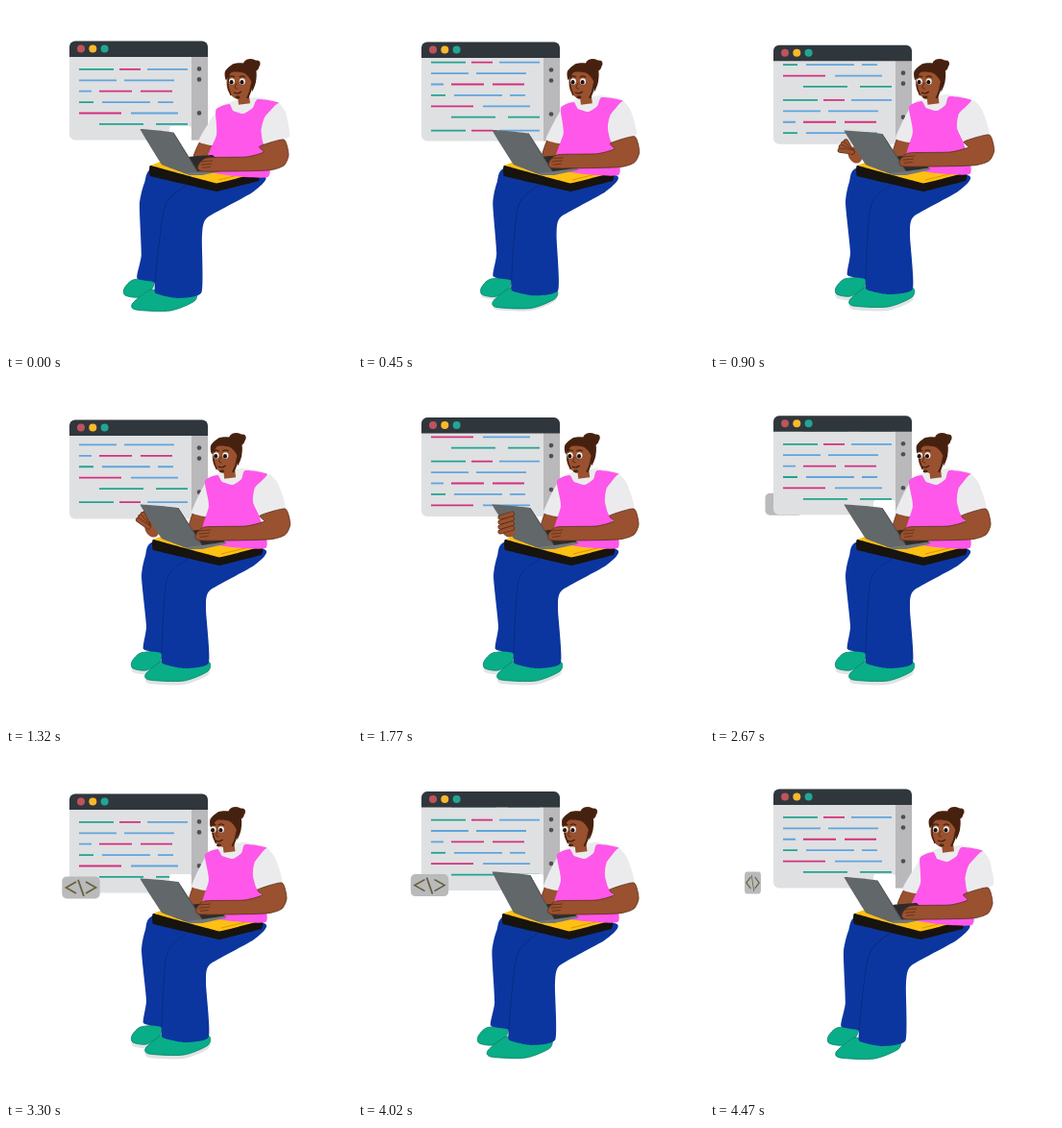
Animation, 360 px wide and 360 px high, one loop 4500 ms. Source, as an HTML page with a canvas:

```html
<!DOCTYPE html>
<html lang="en">
<head>
<meta charset="utf-8">
<title>Coding at a laptop</title>
<style>
html, body { margin: 0; width: 100%; height: 100%; overflow: hidden; background: #fff; }
canvas { display: block; width: 100vw; height: 100vh; }
</style>
</head>
<body>
<canvas id="stage" width="360" height="360"></canvas>
<script>
const ctx = document.getElementById('stage').getContext('2d');
const LOOP = 4500;
const SKIN = '#99512f', SKIN_LINE = '#5a2d18', HAIR = '#47210f';
const PINK = '#fe57ea', TEE = '#ebebed', BLUE = '#0c369f', NAVY = '#092c82', GREEN = '#09ad88';
const TEAL = '#20a491', ROSE = '#d3307f', SKY = '#5fa5dd';

// Timing
const mix = (a, b, k) => a + (b - a) * k;
const part = (t, a, b) => Math.max(0, Math.min(1, (t - a) / (b - a)));
const ramp = (t, a, b) => { const x = part(t, a, b); return x * x * (3 - 2 * x); };
const pulse = (t, a, b) => Math.sin(Math.PI * part(t, a, b));

// Drawing
function trace(p, round, closed) {
  const n = p.length / 2;
  const at = i => {
    i = closed ? (i + n) % n : Math.max(0, Math.min(n - 1, i));
    return [p[2 * i], p[2 * i + 1]];
  };
  const s = round / 6;
  ctx.beginPath();
  ctx.moveTo(p[0], p[1]);
  for (let i = 0; i < (closed ? n : n - 1); i++) {
    const [ax, ay] = at(i - 1), [bx, by] = at(i), [cx, cy] = at(i + 1), [dx, dy] = at(i + 2);
    ctx.bezierCurveTo(bx + (cx - ax) * s, by + (cy - ay) * s, cx - (dx - bx) * s, cy - (dy - by) * s, cx, cy);
  }
  if (closed) ctx.closePath();
}

function shape(fill, p, round = 0.7, line) {
  trace(p, round, true);
  ctx.fillStyle = fill;
  ctx.fill();
  if (line) { ctx.strokeStyle = line; ctx.lineWidth = 0.8; ctx.stroke(); }
}

function stroke(color, width, p, round = 0, cap = 'butt') {
  trace(p, round, false);
  ctx.strokeStyle = color;
  ctx.lineWidth = width;
  ctx.lineCap = cap;
  ctx.stroke();
}

function oval(fill, x, y, rx, ry = rx, tilt = 0) {
  ctx.beginPath();
  ctx.ellipse(x, y, rx, ry, tilt, 0, 7);
  ctx.fillStyle = fill;
  ctx.fill();
}

function box(fill, x, y, w, h, r) {
  ctx.beginPath();
  ctx.roundRect(x, y, w, h, r);
  ctx.fillStyle = fill;
  ctx.fill();
}

function group(x, y, draw) {
  ctx.save();
  ctx.translate(x, y);
  draw();
  ctx.restore();
}

// Sideways lean and vertical stretch around a fixed height
function lean(y, slope, stretch, draw) {
  group(0, y, () => {
    ctx.transform(1, 0, slope, stretch, 0, 0);
    ctx.translate(0, -y);
    draw();
  });
}

// Code rows: dashes as [colour, start, end]
const ROWS = [
  [[TEAL, 76, 112], [ROSE, 118, 140], [SKY, 147, 189]],
  [[SKY, 76, 115], [SKY, 123, 175]],
  [[SKY, 76, 89], [ROSE, 97, 131], [ROSE, 140, 173]],
  [[TEAL, 76, 91], [SKY, 100, 150], [SKY, 158, 174]],
  [[ROSE, 76, 120], [SKY, 130, 179]],
  [[TEAL, 97, 143], [TEAL, 156, 189]]
];
const ROW = 11.4, BLOCK = 71;

function codeWindow(t) {
  box('#dfe0e2', 66, 0, 144, 103, 6);
  box('#b9b8ba', 193, 10, 17, 93, [0, 0, 6, 0]);
  ctx.save();
  ctx.beginPath();
  ctx.rect(66, 16, 127, 79);
  ctx.clip();
  const scroll = 2 * BLOCK * ramp(t, 150, 2200);
  for (let block = 0; block < 3; block++) {
    ROWS.forEach((row, i) => {
      const y = 29.5 + block * BLOCK + i * ROW - scroll;
      for (const [color, x0, x1] of row) stroke(color, 1.8, [x0, y, x1, y]);
    });
  }
  ctx.restore();
  box('#30373c', 66, 0, 144, 16.5, [6, 6, 0, 0]);
  ['#c0525c', '#f7b92c', '#20a695'].forEach((color, i) => oval(color, 78 + 12.3 * i, 8, 4));
  for (const y of [29, 40, 75]) oval('#4c4f54', 201, y, 2.3);
}

function tag(t) {
  const leave = part(t, 4050, 4470);
  const x = 98 - 41 * ramp(t, 2580, 2760) + 21 * ramp(t, 2780, 3180) - 3.5 * ramp(t, 3350, 3800) - 30 * leave ** 2;
  group(x, 92 + 5.5 * ramp(t, 2780, 3000), () => {
    ctx.scale(1 - 0.57 * leave ** 4, 1);
    box('#b9babb', -19.7, -11.5, 39.4, 23, 5);
    if (t < 2780) return;
    for (const side of [-1, 1]) stroke('#67603c', 1.7, [5 * side, -6, 15.5 * side, 0, 5 * side, 6]);
    stroke('#67603c', 1.7, [-3, -8, 3, 9]);
  });
}

function shoe(k, p) {
  group(0, 4 * k, () => shape('#e0e4e4', p));
  shape(GREEN, p, 0.8, '#078367');
}

function legs(k) {
  const back = 1 - k;
  group(-8 * back, back, () => shoe(k, [131, 293, 140, 284, 161, 283, 160, 293, 146, 302, 132, 300]));
  group(-14 * back, 4 * back, () => shoe(k, [146, 305, 165, 291, 180, 297, 210, 293, 210, 303, 185, 313, 149, 312]));
  lean(170, -0.06 * back, 1 + 0.03 * back, () => {
    shape(BLUE, [156, 168, 145, 183, 141, 205, 146, 256, 143, 280, 161, 284, 163, 295, 186, 300, 211, 294, 208, 238, 212, 219, 258, 193, 268, 176], 0.55);
    stroke(NAVY, 1, [190, 185, 169, 204, 164, 240, 162, 284], 1);
  });
}

function tray(k) {
  group(-3 * (1 - k), 0, () => {
    shape('#17130f', [153, 166, 153, 177, 222, 193, 266, 182, 267, 173], 0.08);
    shape('#fec012', [154, 166, 172, 159, 240, 165, 267, 173, 222, 184.5], 0.08);
    stroke('#c98c08', 0.8, [224, 181, 257, 173]);
  });
}

function torso(k, stretch) {
  const front = 1 - k;
  group(3 * front, 3 * front, () => lean(170, -0.13 * front, 1, () => {
    shape(SKIN, [195, 138, 210, 140, 208, 153, 196, 158, 190, 153], 0.4, SKIN_LINE);
    shape(TEE, [211, 102, 202, 117, 193, 138, 210, 142, 217, 125], 0.4);
    shape(TEE, [212, 102, 226, 95, 248, 92, 271, 98, 262, 130, 212, 130], 0.4);
    shape(PINK, [207, 105, 220, 99, 225, 106, 236, 109, 245, 103, 249, 94, 272, 98, 259, 112, 257, 127, 264, 143, 270, 175, 204, 168, 211, 131], 0.6);
    lean(0, 0, 1, () => {
      ctx.transform(stretch, 0, 0, 1, 210 * (1 - stretch), 0);
      shape(TEE, [271, 98, 280, 108, 287, 133, 262, 141, 257, 126, 260, 111], 0.5);
    });
  }));
}

function nearArm(k, stretch) {
  group(210 + 2 * (1 - k), 5 * (1 - k), () => {
    ctx.scale(stretch, 1);
    ctx.translate(-210, 0);
    shape(SKIN, [262, 141, 287, 134, 292, 150, 287, 161, 270, 166, 203, 167, 198, 161, 207, 153, 248, 152, 266, 147], 0.6, SKIN_LINE);
    for (let i = 0; i < 3; i++) stroke(SKIN_LINE, 0.8, [200 + i, 157 + 3.2 * i, 213 - i, 156 + 3.2 * i]);
  });
}

// Four fingers fan out when open and fold over the screen edge when gripping
function farHand(x, grip) {
  group(x, 150, () => {
    oval(SKIN, 4, 5, 7, 9, -0.5);
    for (let i = 0; i < 4; i++) {
      const angle = mix(-2.1 - i * 0.3, -0.3, grip);
      const px = mix(1, -4, grip), py = mix(2, -7 + i * 5, grip);
      const tip = [px + 13 * Math.cos(angle), py + 13 * Math.sin(angle)];
      stroke(SKIN_LINE, 5, [px, py, ...tip], 0, 'round');
      stroke(SKIN, 3.8, [px, py, ...tip], 0, 'round');
    }
  });
}

function laptop(t, k) {
  const top = mix(128, 129.5, k) - 7 * pulse(t, 3600, 4450);
  const right = mix(174, 179, k), hinge = mix(200, 205, k);
  shape('#2c2b2c', [190, 157, 215, 155, 228, 169, 200, 174], 0.1);
  shape('#626769', [139.5, top, right, top + 3.5, hinge, 173.5, 190, 175.5, 162, 165], 0.1);
  stroke('#474a4d', 0.9, [right, top + 3.5, hinge, 173.5]);
  shape('#737679', [188, 174, 204, 172, 228, 168.5, 229, 170.5, 204, 176, 191, 176], 0.2);
}

function head(t, k) {
  const turn = k * (1 + 1.5 * ramp(t, 2300, 2650));
  group(mix(244, 228.5, k) + 3.5 * pulse(t, 1200, 3200), 80, () => {
    stroke(SKIN, 12, [2, 6, 4, 22]);
    oval(HAIR, 11, -18, 8.5, 7, 0.25);
    oval(HAIR, 17, -20, 3.5);
    oval(SKIN, -1, 0, 13.5, 17);
    shape(HAIR, [-15, -3, -16, -12, -7, -20, 6, -20, 16, -13, 16, -1, 12, 9, 11, -2, 4, -10, -9, -11], 0.8);
    stroke(HAIR, 2, [12, 0, 10, 9, 7, 16], 1);
    stroke(HAIR, 1.4, [-12, -8, -13, 3, -10, 13], 1);
    for (const x of [-9 - 1.6 * turn, 1.8 - 2.6 * turn]) {
      oval('#f6f1ee', x, -1.5, 3, 3.3);
      oval('#1d1310', x - 0.4, -0.8, 2, 2.3);
      stroke(HAIR, 1.3, [x - 3.2, -6, x, -7.2, x + 3.2, -6], 1);
    }
    const middle = -4 - 1.6 * turn;
    stroke(SKIN_LINE, 1, [middle, 0, middle - 2, 5, middle + 1, 6], 0.8);
    stroke('#36190e', 1.2, [middle - 3, 10, middle + 1, 11, middle + 5, 9], 1);
    oval('#4d2413', middle + 1, 15, 2.6, 1.4);
  });
}

function draw(t) {
  ctx.fillStyle = '#fff';
  ctx.fillRect(0, 0, 360, 360);

  const top = 39 - 2.7 * Math.cos(2 * Math.PI * (t - 100) / 2250);
  const settle = ramp(t, 150, 650);
  const body = settle - ramp(t, 4050, 4400);
  const leg = settle - ramp(t, 3550, 4250);
  const stretch = 1 + 0.045 * (ramp(t, 500, 800) - ramp(t, 1450, 1700));
  const raise = ramp(t, 350, 750) - ramp(t, 2100, 2450);
  const grip = ramp(t, 1200, 1650);

  group(0, top, () => {
    const inFront = t > 2780;
    if (t > 2600 && !inFront) tag(t);
    codeWindow(t);
    if (inFront) tag(t);
  });
  if (raise === 0) box('#fff', 170, 125, 23, 25, 3);

  legs(leg);
  tray(leg);
  torso(body, stretch);
  head(t, body);
  const hand = () => farHand(mix(174, 147 + 5 * grip, raise), grip);
  const over = grip > 0.5;
  if (raise > 0 && !over) hand();
  laptop(t, body);
  if (raise > 0.5 && over) hand();
  nearArm(body, stretch);
}

function tick() {
  draw(performance.now() % LOOP);
  requestAnimationFrame(tick);
}
tick();
</script>
</body>
</html>
```
